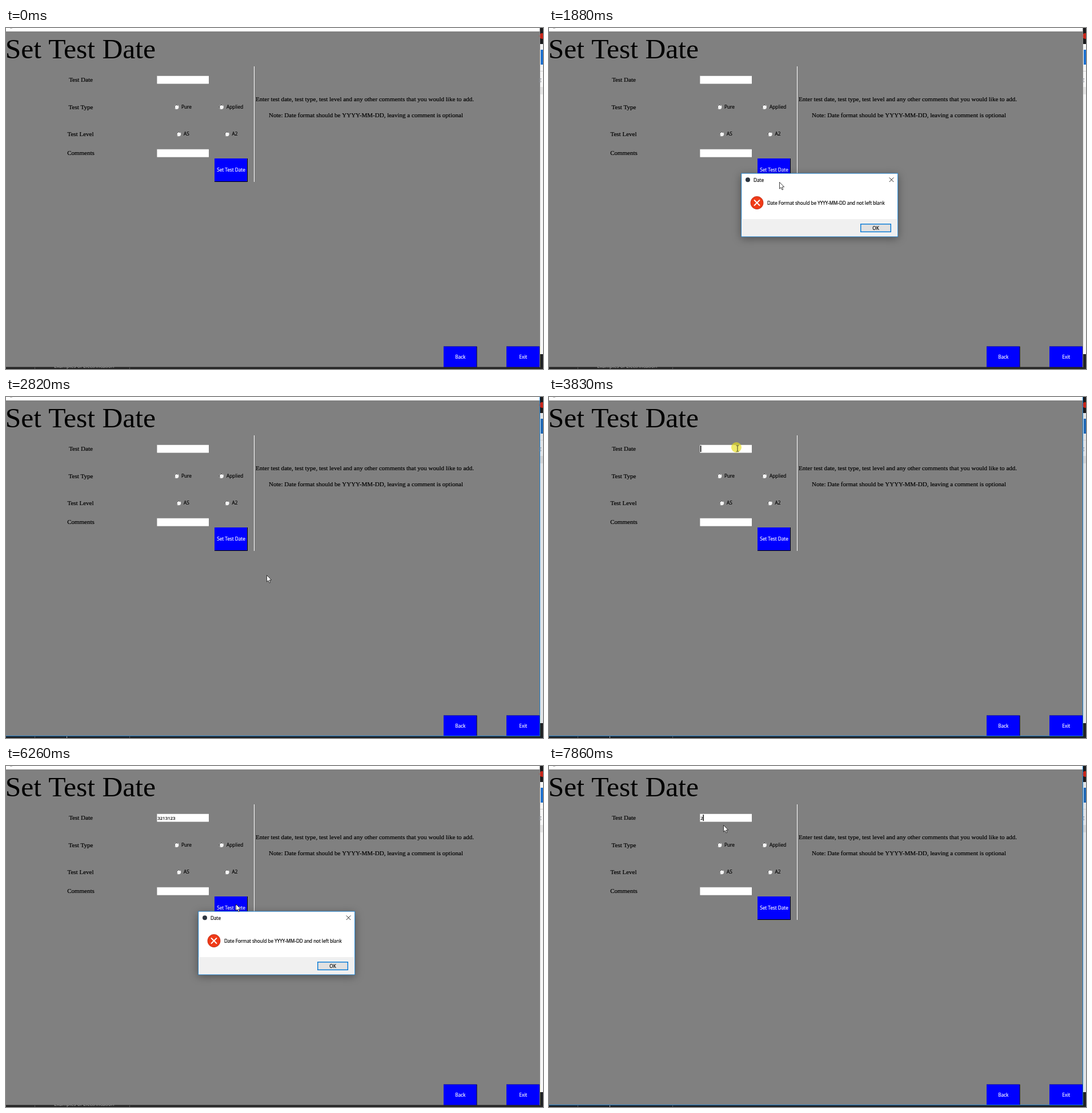
An HTML page with a canvas for the animation above (8 s loop, 940 px wide and 596 px high).

```html
<!DOCTYPE html>
<html lang="en">
<head>
<meta charset="utf-8">
<title>Set Test Date</title>
<style>
html, body { margin: 0; width: 100%; height: 100%; overflow: hidden; background: #808080; }
canvas { display: block; }
</style>
</head>
<body>
<canvas id="stage" width="940" height="596"></canvas>
<script>
const ctx = document.getElementById('stage').getContext('2d');
const LOOP = 8000;
const SERIF = '"Liberation Serif", "Times New Roman", serif';
const SANS = '"Open Sans", "Noto Sans", sans-serif';
const ENTRY = '3213123';

// Each attempt presses the button and gets the error dialog
const attempts = [
  { press: 1230, release: 1550, open: 1620, close: 2820, x: 403, y: 268 },
  { press: 5880, release: 6110, open: 6260, close: 6790, x: 402, y: 241 }
];
const fieldClick = { press: 3740, release: 3910, x: 328, y: 88 };

// Pointer moves, each eased from where the last one ended
const moves = [
  { from: 0, to: 220, x: 673, y: 414 },
  { from: 370, to: 590, x: 470, y: 276 },
  { from: 760, to: 980, x: 403, y: 269 },
  { from: 1900, to: 2220, x: 456, y: 311 },
  { from: 3060, to: 3290, x: 345, y: 83 },
  { from: 3360, to: 3580, x: 330, y: 90 },
  { from: 5140, to: 5430, x: 405, y: 272 },
  { from: 5440, to: 5720, x: 402, y: 241 },
  { from: 7050, to: 7400, x: 305, y: 103 }
];

const between = (t, a, b) => t >= a && t < b;
const ease = p => p * p * (3 - 2 * p);

function pointerAt(t) {
  let x = 812, y = 547;
  for (const m of moves) {
    const p = ease(Math.min(1, Math.max(0, (t - m.from) / (m.to - m.from))));
    x += (m.x - x) * p;
    y += (m.y - y) * p;
  }
  return { x, y };
}

// One key, then a quick burst; the field empties when the dialog closes
function valueAt(t) {
  if (t >= 7860) return '2';
  if (t < 4060 || t >= 6790) return '';
  const burst = Math.floor((t - 4300) / 60);
  return ENTRY.slice(0, 1 + Math.max(0, burst));
}

function caretAt(t) {
  const reset = [3740, 4060, 4610, 6790].filter(r => r <= t).pop();
  return (t - reset) % 900 < 600;
}

function box(x, y, w, h, color) {
  ctx.fillStyle = color;
  ctx.fillRect(x, y, w, h);
}

function disc(x, y, r, color) {
  ctx.fillStyle = color;
  ctx.beginPath();
  ctx.arc(x, y, r, 0, Math.PI * 2);
  ctx.fill();
}

function cross(x, y, r, color, width) {
  ctx.strokeStyle = color;
  ctx.lineWidth = width;
  ctx.beginPath();
  ctx.moveTo(x - r, y - r);
  ctx.lineTo(x + r, y + r);
  ctx.moveTo(x + r, y - r);
  ctx.lineTo(x - r, y + r);
  ctx.stroke();
}

function text(str, x, y, size, { font = SANS, color = '#000', align = 'left', weight = 0.2 } = {}) {
  ctx.font = `${size}px ${font}`;
  ctx.textAlign = align;
  ctx.fillStyle = ctx.strokeStyle = color;
  ctx.fillText(str, x, y);
  if (weight) {
    ctx.lineWidth = weight;
    ctx.strokeText(str, x, y);
  }
}

const serif = (str, x, y) => text(str, x, y, 11.02, { font: SERIF, align: 'center' });

function entry(y) {
  box(264, y, 91, 14, '#b0b0b0');
  box(264.6, y + 0.6, 90.4, 13.4, '#fff');
}

function radio(x, y, label, labelX) {
  disc(x, y, 3.9, '#f4f4f4');
  ctx.lineWidth = 1;
  ctx.strokeStyle = '#3a3a3a';
  ctx.beginPath();
  ctx.arc(x, y, 3.5, Math.PI * 0.75, Math.PI * 1.75);
  ctx.stroke();
  text(label, labelX, y + 3.1, 8.3);
}

function button(x, y, w, h, label, down) {
  box(x, y, w, h, down ? '#fff' : '#000');
  box(x, y, w - 1, h - 1, down ? '#555' : '#00f');
  box(x + 1, y + 1, w - 2, h - 2, down ? '#f0f0f0' : '#00f');
  const shift = down ? 0.7 : 0;
  text(label, x + w / 2 + shift, y + h / 2 + 2.7 + shift, 8.2,
    { color: down ? '#000' : '#fff', align: 'center' });
}

function form(t) {
  box(0, 0, 935, 593, '#808080');
  box(0, 0, 934, 6, '#fff');
  box(7, 0, 4, 0.7, '#999');

  text('Set Test Date', -1.3, 53, 49.5, { font: SERIF, weight: 0 });
  serif('Test Date', 131, 94);
  serif('Test Type', 131, 142);
  serif('Test Level', 130.5, 189);
  serif('Comments', 131, 222);
  serif('Enter test date, test type, test level and any other comments that you would like to add.', 628, 128);
  serif('Note: Date format should be YYYY-MM-DD, leaving a comment is optional', 630, 156);

  entry(83.4);
  entry(211.6);
  radio(298.5, 138, 'Pure', 307);
  radio(377, 138, 'Applied', 386);
  radio(302.3, 185.3, 'AS', 311);
  radio(386.8, 185.3, 'A2', 395.5);
  box(434, 67, 1, 202, '#fff');

  const pressed = attempts.some(a => between(t, a.press + 70, a.release));
  button(365, 228, 58, 41, 'Set Test Date', pressed);
  button(766, 556.6, 58.5, 38, 'Back');
  button(876, 556.6, 58.5, 38, 'Exit');

  const value = valueAt(t);
  text(value, 265.3, 93.8, 7.8);
  const typing = t >= fieldClick.press && !attempts.some(a => between(t, a.open, a.close));
  if (typing && caretAt(t)) box(265 + ctx.measureText(value).width, 85, 1.4, 11, '#000');
}

function desktop(active) {
  // Browser page peeking out on the right
  box(935, 0, 5, 570, active ? '#e0e3e6' : '#f6f6f6');
  box(935, 0, 5, 28, '#1b1b1d');
  disc(938.5, 14, 5, '#c8261a');
  box(936, 38, 4, 26, active ? '#1c66b5' : '#1c6fce');
  box(935, 75, 5, 1, '#d0d0d0');
  text('g', 932.5, 93, 9, { color: '#8a8f98', weight: 0 });
  box(935, 103, 5, 13, active ? '#cfd2d5' : '#e4e4e4');
  box(935, 570, 5, 26, '#202225');

  // Taskbar sliver
  box(0, 592.5, 940, 4, active ? '#1c2227' : '#252525');
  box(50, 593, 1, 3, '#555');
  box(216, 593, 1, 3, '#555');
  if (active) {
    box(106, 593, 1, 3, '#aaa');
  } else {
    ctx.save();
    ctx.beginPath();
    ctx.rect(0, 592, 934, 4);
    ctx.clip();
    text('Examples of Electrification', 84, 594, 8.6, { color: '#b5b5b5', weight: 0 });
    ctx.restore();
  }

  // Window edge
  box(934, 0, 1, 593, active ? '#1c7cc9' : '#8c8c8c');
  if (active) box(0, 592, 935, 1, '#1c7cc9');
}

function dialog() {
  ctx.save();
  ctx.shadowColor = 'rgba(0,0,0,.38)';
  ctx.shadowBlur = 14;
  ctx.shadowOffsetY = 3;
  box(336.3, 253.7, 274.7, 111.5, '#1883d7');
  ctx.restore();
  box(337.2, 254.6, 272.9, 109.6, '#fff');
  box(337.2, 334, 272.9, 30.2, '#f0f0f0');

  disc(348, 265.3, 4, '#2c3540');
  text('Date', 358, 268.6, 8.2);
  cross(599.5, 265.2, 3.8, '#222', 1);

  disc(364, 305.5, 11.4, '#c8341c');
  disc(364, 305.5, 10.5, '#f03a17');
  cross(364, 305.5, 5, '#fff', 1.9);
  text('Date Format should be YYYY-MM-DD and not left blank', 382, 308.8, 8.05);

  box(545, 342, 54, 15, '#0078d7');
  box(546.4, 343.4, 51.2, 12.2, '#e1e1e1');
  text('OK', 572, 352.8, 8.2, { align: 'center' });
}

function arrow(x, y) {
  const outline = [[0, 0], [0, 11.5], [2.6, 9.2], [4.5, 13.4], [6.3, 12.6], [4.5, 8.5], [8.2, 8.3]];
  ctx.beginPath();
  outline.forEach(([dx, dy]) => ctx.lineTo(x + 0.5 + dx, y + 0.5 + dy));
  ctx.closePath();
  ctx.fillStyle = '#fff';
  ctx.fill();
  ctx.strokeStyle = '#111';
  ctx.lineWidth = 0.8;
  ctx.stroke();
}

function ibeam(x, y) {
  box(x - 0.5, y - 5, 1, 10, '#3a3a20');
  box(x - 2.5, y - 5.5, 5, 0.8, '#3a3a20');
  box(x - 2.5, y + 4.7, 5, 0.8, '#3a3a20');
}

function draw(t) {
  const open = attempts.some(a => between(t, a.open, a.close));
  form(t);
  desktop(t >= attempts[0].press && !open);
  if (open) dialog();

  for (const c of [...attempts, fieldClick]) {
    if (between(t, c.press, c.release)) disc(c.x, c.y, 9, 'rgba(232,222,25,.65)');
  }

  const { x, y } = pointerAt(t);
  if (between(t, 3290, 5210)) ibeam(x, y);
  else if (t >= 70) arrow(x, y);
}

function tick() {
  draw(performance.now() % LOOP);
  requestAnimationFrame(tick);
}
tick();
</script>
</body>
</html>
```
